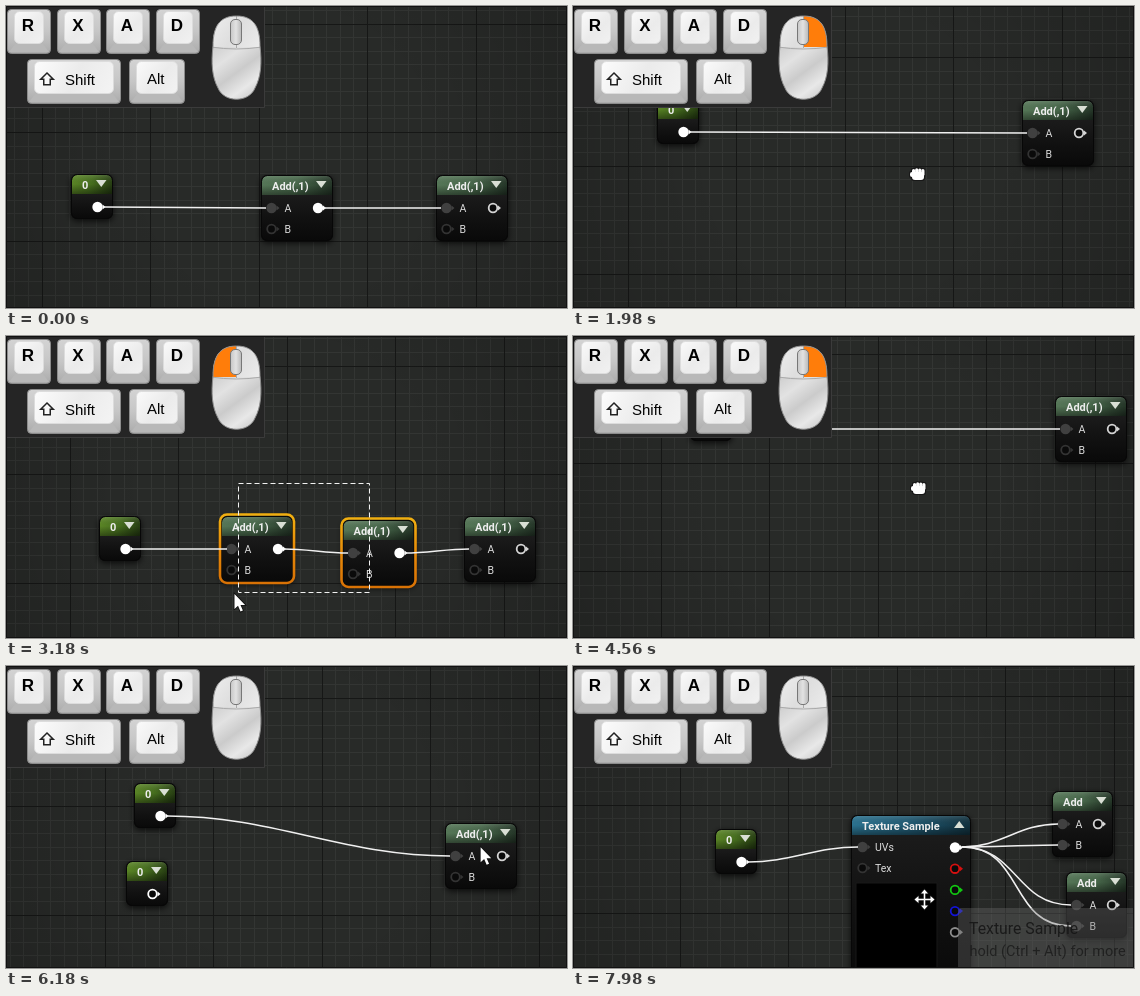
An HTML page with a canvas that plays this animation: 561x302 px, repeating every 8 s.

```html
<!DOCTYPE html>
<html lang="en">
<head>
<meta charset="utf-8">
<title>Node graph shortcuts</title>
<style>
html, body { margin: 0; width: 100%; height: 100%; overflow: hidden; background: #262826; }
canvas { display: block; width: 561px; height: 302px; }
</style>
</head>
<body>
<canvas id="stage" width="561" height="302"></canvas>
<script>
const W = 561, H = 302, LOOP = 8000, STEP = 60;
const ctx = document.getElementById('stage').getContext('2d');
const UI = 'Roboto, "Open Sans", sans-serif';
const KEY = '"Liberation Sans", Arial, sans-serif';
const ORANGE = '#ff7d0a';

// Time, x, y. Camera offsets and cursor path.
const CAMERA = [
  [0, 0, 0], [1860, 0, 0], [1980, 19, -75], [2340, 28, -313.5],
  [4260, 28, -313.5], [4560, 52, -433.5], [5100, 63, -637],
  [6780, 63, -637], [7080, 66, -682], [7620, 71, -964]
];
const CURSOR = [
  [120, 490, 228], [420, 292, 181], [1440, 292, 181], [1740, 325, 243],
  [1860, 325, 243], [1980, 344, 168], [2240, 351, 8], [2460, 353, 8],
  [2700, 364, 147], [3180, 228.5, 258], [3660, 228.5, 258], [4200, 321, 271],
  [4260, 321, 271], [4560, 345, 152], [4900, 352, 8], [5100, 352, 8],
  [5460, 316.5, 156], [5940, 316.5, 156], [6300, 530, 190], [6780, 425, 252],
  [6840, 425, 252], [7080, 428, 207], [7480, 430, 8], [7620, 430, 8],
  [7860, 351.5, 233.5]
];
const PANS = [[1920, 2400], [4320, 5160], [6840, 7620]];
const CLICKS = [[480, 660], [2700, 3300], [5460, 5640]];
const X_DOWN = [[1200, 1440], [3540, 3780], [5760, 6060]];
const DELETED = [1260, 3600, 5820];

const within = (t, spans) => spans.some(([a, b]) => t >= a && t < b);

function along(path, t, ease) {
  if (t <= path[0][0]) return path[0].slice(1);
  for (let i = 1; i < path.length; i++) {
    const a = path[i - 1], b = path[i];
    if (t <= b[0]) {
      let k = (t - a[0]) / (b[0] - a[0]);
      if (ease) k = k * k * (3 - 2 * k);
      return [a[1] + (b[1] - a[1]) * k, a[2] + (b[2] - a[2]) * k];
    }
  }
  return path[path.length - 1].slice(1);
}

function box(x, y, w, h, r, fill, stroke, lw = 1) {
  ctx.beginPath();
  ctx.roundRect(x, y, w, h, r);
  if (fill) { ctx.fillStyle = fill; ctx.fill(); }
  if (stroke) { ctx.strokeStyle = stroke; ctx.lineWidth = lw; ctx.stroke(); }
}

function poly(points, fill, stroke, lw = 1) {
  ctx.beginPath();
  points.forEach(([x, y]) => ctx.lineTo(x, y));
  ctx.closePath();
  if (stroke) { ctx.strokeStyle = stroke; ctx.lineWidth = lw; ctx.stroke(); }
  if (fill) { ctx.fillStyle = fill; ctx.fill(); }
}

function text(s, x, y, font, color) {
  ctx.font = font;
  ctx.fillStyle = color;
  ctx.fillText(s, x, y);
}

function ramp(x0, y0, x1, y1, ...colors) {
  const g = ctx.createLinearGradient(x0, y0, x1, y1);
  colors.forEach((c, i) => g.addColorStop(i / (colors.length - 1), c));
  return g;
}

function drawGrid([cx, cy]) {
  const major = 108.5, minor = major / 8;
  ctx.fillStyle = '#282a28';
  ctx.fillRect(0, 0, W, H);
  const lines = (gap, color) => {
    ctx.fillStyle = color;
    const ox = (((36 + cx) % major) + major) % major - major;
    const oy = (((126.5 + cy) % major) + major) % major - major;
    for (let x = ox; x < W; x += gap) ctx.fillRect(Math.floor(x), 0, 1, H);
    for (let y = oy; y < H; y += gap) ctx.fillRect(0, Math.floor(y), W, 1);
  };
  lines(minor, '#333533');
  lines(major, '#161716');
  const v = ctx.createRadialGradient(W / 2, H / 2, 140, W / 2, H / 2, 340);
  v.addColorStop(0, 'rgba(0,0,0,0)');
  v.addColorStop(1, 'rgba(0,0,0,.18)');
  ctx.fillStyle = v;
  ctx.fillRect(0, 0, W, H);
}

function pin(x, y, color, filled) {
  ctx.beginPath();
  ctx.arc(x, y, filled ? 5.2 : 4.3, 0, 7);
  ctx.fillStyle = filled ? color : '#0a0a0a';
  ctx.fill();
  if (!filled) { ctx.strokeStyle = color; ctx.lineWidth = 1.8; ctx.stroke(); }
  poly([[x + 5, y - 2.5], [x + 8, y], [x + 5, y + 2.5]], color);
}

// Joins two pin centres, edge to edge.
function wire(x0, y0, x1, y1) {
  x0 += 6;
  x1 -= 5;
  const d = (Math.abs(x1 - x0) + Math.abs(y1 - y0)) / 3;
  ctx.beginPath();
  ctx.moveTo(x0, y0);
  ctx.bezierCurveTo(x0 + d, y0, x1 - d, y1, x1, y1);
  ctx.strokeStyle = '#f0f0f0';
  ctx.lineWidth = 1.5;
  ctx.stroke();
}

function frame(x, y, w, h, colors, title, selected, up) {
  ctx.save();
  ctx.shadowColor = 'rgba(0,0,0,.75)';
  ctx.shadowBlur = 6;
  ctx.shadowOffsetY = 2;
  box(x, y, w, h, 6, '#0c0c0c');
  ctx.restore();
  box(x, y, w, h, 6, ramp(0, y + 20, 0, y + h, '#1b1b1b', '#111', '#090909'));
  box(x + 1, y + 1, w - 2, 19, [5, 5, 0, 0], ramp(x, y, x + w, y + 10, ...colors));
  box(x + 1, y + 1, w - 2, 19, [5, 5, 0, 0],
    ramp(0, y, 0, y + 20, 'rgba(255,255,255,.16)', 'rgba(0,0,0,.02)', 'rgba(0,0,0,.42)'));
  box(x + .5, y + .5, w - 1, h - 1, 6, null, '#070707');
  if (selected) {
    box(x - 1, y - 1.5, w + 2, h + 2.5, 7, null,
      ramp(0, y, 0, y + h, '#f0ae10', '#e88a08', '#d87205'), 2.6);
  }
  text(title, x + 11, y + 14.5, `bold 11px ${UI}`, '#eee');
  const tx = x + w - 17, ty = y + (up ? 13 : 6), d = up ? -7 : 7;
  poly([[tx, ty], [tx + 10.5, ty], [tx + 5.25, ty + d]], '#d9dfd5');
}

function constant(x, y, linked = true) {
  frame(x, y, 42, 45, ['#5f8b27', '#48711f', '#263d12'], '0');
  pin(x + 26.5, y + 33, '#fff', linked);
}

function add(x, y, { wide = true, a = true, b = false, out = true, selected = false } = {}) {
  const w = wide ? 72 : 61;
  frame(x, y, w, 66, ['#587a5a', '#496a4c', '#243527'], wide ? 'Add(,1)' : 'Add', selected);
  pin(x + 10.5, y + 33, a ? '#404040' : '#333', a);
  pin(x + 10.5, y + 54, b ? '#404040' : '#333', b);
  text('A', x + 23.5, y + 37, `10.5px ${UI}`, '#ddd');
  text('B', x + 23.5, y + 58, `10.5px ${UI}`, '#ddd');
  pin(x + (wide ? 57 : 46), y + 33, out ? '#fff' : '#d4d4d4', out);
}

function textureSample(x, y) {
  frame(x, y, 120, 170, ['#2c7593', '#215a73', '#12323f'], 'Texture Sample', false, true);
  box(x + 5, y + 68, 81, 90, 0, '#000', '#191919');
  pin(x + 11.5, y + 32, '#404040', true);
  pin(x + 11.5, y + 53, '#333', false);
  text('UVs', x + 24, y + 36, `10.5px ${UI}`, '#ddd');
  text('Tex', x + 24, y + 57, `10.5px ${UI}`, '#ddd');
  ['#fff', '#d51010', '#12c812', '#1414d8', '#8d8d8d'].forEach((c, i) =>
    pin(x + 104, y + 32.5 + i * 21.2, c, i === 0));
}

// Each row is laid out in the view its camera stop gives.
const ROWS = [
  { cam: [0, 0], draw(t) {
    const gone = t >= DELETED[0];
    constant(65, 168);
    if (!gone) add(255, 169, { selected: t >= 540 });
    add(430, 169, { out: false });
    if (gone) wire(92, 201, 440, 202);
    else { wire(92, 201, 265, 202); wire(312, 202, 440, 202); }
  } },
  { cam: [28, -313.5], draw(t) {
    const gone = t >= DELETED[1];
    constant(93, 180);
    if (!gone) {
      add(215, 180, { selected: t >= 3000 });
      add(336.5, 184, { selected: t >= 2760 });
    }
    add(458, 180, { out: false });
    if (gone) wire(120, 213, 468, 213);
    else { wire(120, 213, 226, 213); wire(272, 213, 347, 217); wire(393, 217, 468, 213); }
  } },
  { cam: [63, -637], draw(t) {
    const gone = t >= DELETED[2];
    constant(128, 117);
    constant(120, 195, !gone);
    if (!gone) add(291, 144, { wide: false, b: true, selected: t >= 5640 });
    add(439, 157, { out: false });
    if (gone) wire(155, 150, 449, 190);
    else { wire(155, 150, 301, 177); wire(147, 228, 301, 198); wire(337, 177, 449, 190); }
  } },
  { cam: [71, -964], draw() {
    const opts = { wide: false, b: true, out: false };
    constant(142, 163);
    textureSample(278, 149);
    add(479, 125, opts);
    add(493, 206, opts);
    wire(169, 196, 290, 181);
    for (const [x, y] of [[490, 158], [490, 179], [503, 239], [503, 260]]) wire(383, 181, x, y);
  } }
];

function drawKey(x, y, w, h, down) {
  box(x + .5, y + .5, w - 1, h - 1, 4, ramp(0, y, 0, y + h, '#d4d4d4', '#c6c6c6', '#aaa'), '#8c8c8c');
  poly([[x + 2, y + h - 2], [x + 8, y + h - 10], [x + w - 8, y + h - 10], [x + w - 2, y + h - 2]], '#b8b8b8');
  box(x + 7.5, y + 2.5, w - 15, h - 13, 5,
    down ? ORANGE : ramp(x, y, x + w, y + h, '#fff', '#ebebeb', '#f6f6f6'), '#dcdcdc');
}

function drawMouse(left, right) {
  const body = new Path2D('M230.500 10C247 10 254 20 254 40C256 57 255 71 249 82C243 97 218 97 212 82C206 71 205 57 207 40C207 20 214 10 230.500 10Z');
  ctx.save();
  ctx.fillStyle = ramp(210, 40, 250, 94, '#d0d0d0', '#e2e2e2', '#cbcbcb', '#e8e8e8', '#c4c4c4');
  ctx.fill(body);
  ctx.clip(body);
  ctx.fillStyle = ramp(206, 10, 255, 42, '#eee', '#dedede', '#ececec');
  ctx.fillRect(205, 8, 52, 33);
  ctx.fillStyle = ORANGE;
  if (left) ctx.fillRect(205, 8, 25.5, 33);
  if (right) ctx.fillRect(230.5, 8, 26, 33);
  ctx.strokeStyle = '#aaa';
  ctx.lineWidth = 1;
  ctx.beginPath();
  ctx.moveTo(205, 41);
  ctx.quadraticCurveTo(230, 45, 256, 41);
  ctx.moveTo(230.5, 10);
  ctx.lineTo(230.5, 42);
  ctx.stroke();
  ctx.restore();
  ctx.strokeStyle = '#8c8c8c';
  ctx.lineWidth = 1;
  ctx.stroke(body);
  box(224.5, 13.5, 11, 25, 4.5, ramp(224, 0, 236, 0, '#c4c4c4', '#e2e2e2', '#b4b4b4'), '#777');
}

function drawPanel(t) {
  box(0, 0, 258, 101, 0, '#252525');
  box(-.5, .5, 259, 101, 0, null, '#3b3b3b');
  'RXAD'.split('').forEach((c, i) => {
    const x = Math.round(1 + i * 49.5);
    drawKey(x, 3, 44, 45, c === 'X' && within(t, X_DOWN));
    ctx.textAlign = 'center';
    text(c, x + 21, 25, `bold 17px ${KEY}`, '#000');
    ctx.textAlign = 'left';
  });
  drawKey(21, 53, 94, 45);
  drawKey(123, 53, 56, 45);
  text('Shift', 59, 78.5, `15px ${KEY}`, '#000');
  text('Alt', 141, 77.5, `15px ${KEY}`, '#000');
  poly([[41, 68], [45.5, 72.5], [43.5, 72.5], [43.5, 78], [38.5, 78], [38.5, 72.5], [36.5, 72.5]], '#f8f8f8', '#222', 3);
  drawMouse(within(t, CLICKS), within(t, PANS));
}

function drawArrow(x, y) {
  poly([[x, y], [x, y + 15], [x + 3.5, y + 11.8], [x + 6, y + 17.6], [x + 8.4, y + 16.6],
    [x + 6, y + 11], [x + 10.6, y + 11]], '#fff', '#111', 1.6);
}

function drawHand(x, y) {
  ctx.save();
  ctx.translate(x, y);
  for (const [grow, color] of [[1, '#181818'], [0, '#fff']]) {
    for (let i = 0; i < 4; i++) {
      box(-5 + i * 3.1 - grow, -6 + Math.abs(i - 1.4) * .7 - grow, 3.2 + 2 * grow, 7 + 2 * grow, 1.6, color);
    }
    box(-7 - grow, -2 - grow, 6 + 2 * grow, 5 + 2 * grow, 2, color);
    box(-5 - grow, -2 - grow, 12 + 2 * grow, 8 + 2 * grow, 3, color);
  }
  ctx.restore();
}

function drawCross(x, y) {
  for (const [color, lw] of [['#111', 3.2], ['#fff', 1.5]]) {
    for (let i = 0; i < 4; i++) {
      ctx.save();
      ctx.translate(x, y);
      ctx.rotate(i * Math.PI / 2);
      ctx.beginPath();
      ctx.moveTo(0, 0);
      ctx.lineTo(0, -7);
      ctx.strokeStyle = color;
      ctx.lineWidth = lw;
      ctx.stroke();
      poly([[0, -10], [3.5, -6], [-3.5, -6]], color, lw > 2 ? color : null, 1.5);
      ctx.restore();
    }
  }
}

function drawMarquee(x, y) {
  ctx.setLineDash([5, 3]);
  box(x + 4, 147.5, 359.5 - x, Math.max(0, y - 149), 0, null, '#f2f2f2');
  ctx.setLineDash([]);
}

function drawTooltip(alpha) {
  ctx.save();
  ctx.globalAlpha = alpha;
  box(385, 242, 190, 70, 3, 'rgba(110,110,110,.36)');
  text('Texture Sample', 396, 267.5, `15.8px ${UI}`, 'rgba(20,20,20,.85)');
  text('hold (Ctrl + Alt) for more', 396.5, 290, `14.5px ${UI}`, 'rgba(20,20,20,.7)');
  ctx.restore();
}

function render(t) {
  const cam = along(CAMERA, t);
  drawGrid(cam);
  for (const row of ROWS) {
    const dx = cam[0] - row.cam[0], dy = cam[1] - row.cam[1];
    if (Math.abs(dy) > H) continue;
    ctx.save();
    ctx.translate(Math.round(dx), Math.round(dy));
    row.draw(t);
    ctx.restore();
  }
  const panning = within(t, PANS);
  const [x, y] = along(CURSOR, t, !panning);
  if (t >= 2760 && t < 3300) drawMarquee(x, y);
  if (t >= 7860) drawTooltip(Math.min(1, (t - 7860) / 120));
  drawPanel(t);
  box(.5, .5, W - 1, H - 1, 0, null, '#111');
  if (t < 120) return;
  if (panning) drawHand(x, y);
  else if (t > 7680 && x < 398 && y > 149) drawCross(x, y);
  else drawArrow(x, y);
}

function tick(now) {
  render(Math.floor((now % LOOP) / STEP) * STEP);
  requestAnimationFrame(tick);
}
requestAnimationFrame(tick);
</script>
</body>
</html>
```
